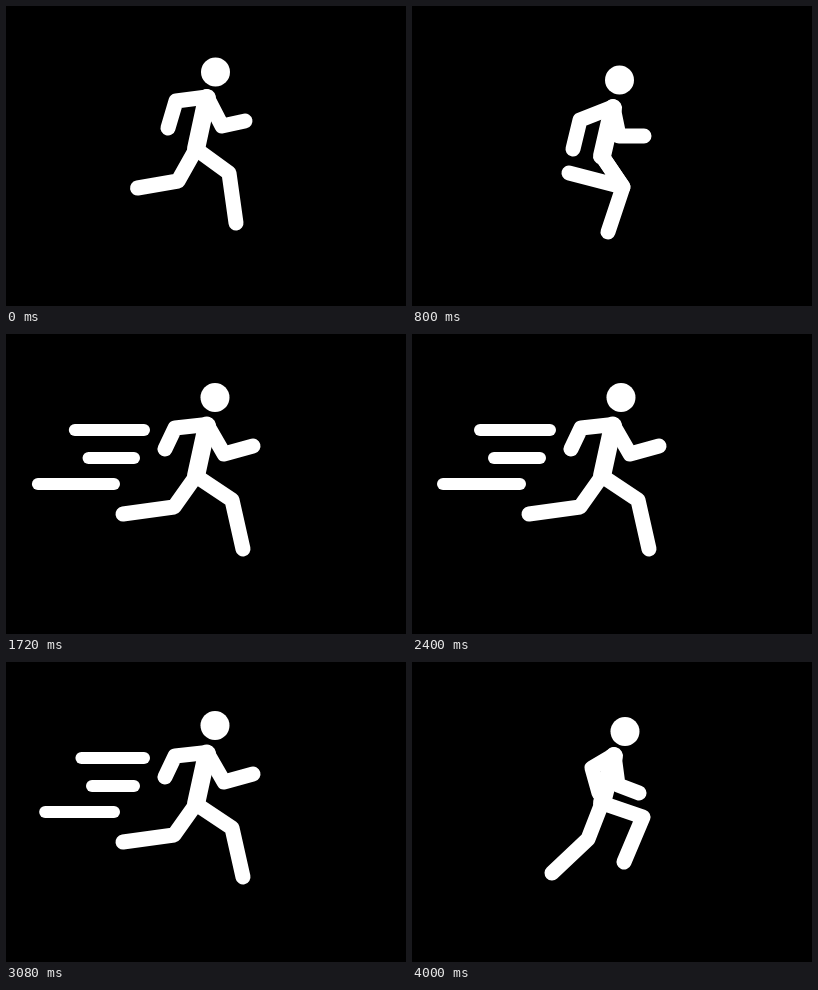
Animation, 400 px wide and 300 px high, one loop 4.04 s. Source, as an HTML page with a canvas:

```html
<!DOCTYPE html>
<html lang="en">
<head>
<meta charset="utf-8">
<title>Runner</title>
<style>
html, body { margin: 0; height: 100%; overflow: hidden; background: #000; }
canvas { display: block; }
</style>
</head>
<body>
<canvas id="stage" width="400" height="300"></canvas>
<script>
const ctx = document.getElementById('stage').getContext('2d');
const LOOP = 4040, STEP = 40, STRIDE = 340;

// One side of the body over two strides: time, knee, foot, elbow, hand
const limbKeys = [
  [0, 223, 167, 230, 217, 170, 95, 162, 122],
  [20, 226, 166, 237, 215, 169, 94, 159, 115],
  [120, 211, 181, 196, 226, 168, 114, 161, 143],
  [180, 197, 181, 173, 223.5, 184, 121, 190, 141],
  [260, 176, 177, 140, 211, 206, 123, 227, 131],
  [300, 169, 170, 131.5, 208, 213, 121, 236, 121],
  [340, 172, 175, 131.5, 182, 216, 120, 239, 115],
  [360, 168, 173, 117, 180, 218, 120, 247, 112],
  [460, 211, 181, 157, 167, 207, 130, 232, 130],
  [600, 231, 155, 212, 200, 180, 106, 187, 131],
  [640, 232, 158, 226, 209, 173, 97, 171, 127]
];

// Trunk over one stride: time, head, neck, hip
const trunkKeys = [
  [0, 209.5, 66, 201, 91, 190, 143],
  [20, 209, 63.5, 201, 90.5, 190, 142],
  [120, 207.5, 74, 201, 101, 190, 150],
  [260, 213, 69.5, 202, 93, 190, 141],
  [300, 211, 67, 200, 90, 190, 141]
];

// Speed lines: left end, right end, y, delay when leaving
const speedLines = [[68, 138, 96, 0], [82, 128, 124, 40], [31, 108, 150, 0]];

function pose(keys, time, period) {
  const t = time % period;
  const i = keys.findLastIndex(k => k[0] <= t);
  const a = keys[i], b = keys[(i + 1) % keys.length];
  const end = b[0] > a[0] ? b[0] : period;
  const u = (t - a[0]) / (end - a[0]);
  return a.map((v, j) => v + (b[j] - v) * u).slice(1);
}

function stroke(width, ...pts) {
  ctx.lineWidth = width;
  ctx.beginPath();
  for (let i = 0; i < pts.length; i += 2) ctx.lineTo(pts[i], pts[i + 1]);
  ctx.stroke();
}

const progress = (t, start, end) => Math.min(1, Math.max(0, (t - start) / (end - start)));
const easeIn = u => 0.28 * u + 0.72 * u ** 3;

function drawRunner(t) {
  const [headX, headY, neckX, neckY, hipX, hipY] = pose(trunkKeys, t, STRIDE);
  ctx.beginPath();
  ctx.arc(headX, headY, 14.5, 0, 2 * Math.PI);
  ctx.fill();
  stroke(18, neckX, neckY + 1, hipX, hipY);
  for (const shift of [0, STRIDE]) {
    const limbs = pose(limbKeys, t + shift, 2 * STRIDE);
    stroke(15, hipX, hipY, ...limbs.slice(0, 4));
    stroke(15, neckX, neckY, ...limbs.slice(4));
  }
}

function drawSpeedLines(t) {
  const hiddenIn = easeIn(1 - progress(t, 800, 1760));
  for (const [left, right, y, delay] of speedLines) {
    const hidden = Math.max(hiddenIn, easeIn(progress(t, 2790 + delay, 3740 + delay)));
    if (hidden < 1) stroke(12, left + (right - left) * hidden, y, right, y);
  }
}

function frame(now) {
  const t = Math.floor(now % LOOP / STEP) * STEP;
  ctx.fillStyle = '#000';
  ctx.fillRect(0, 0, 400, 300);
  ctx.fillStyle = ctx.strokeStyle = '#fff';
  ctx.lineCap = ctx.lineJoin = 'round';
  drawSpeedLines(t);
  drawRunner(t);
}

const origin = performance.now();
function tick() {
  frame(performance.now() - origin);
  requestAnimationFrame(tick);
}
tick();
</script>
</body>
</html>
```
